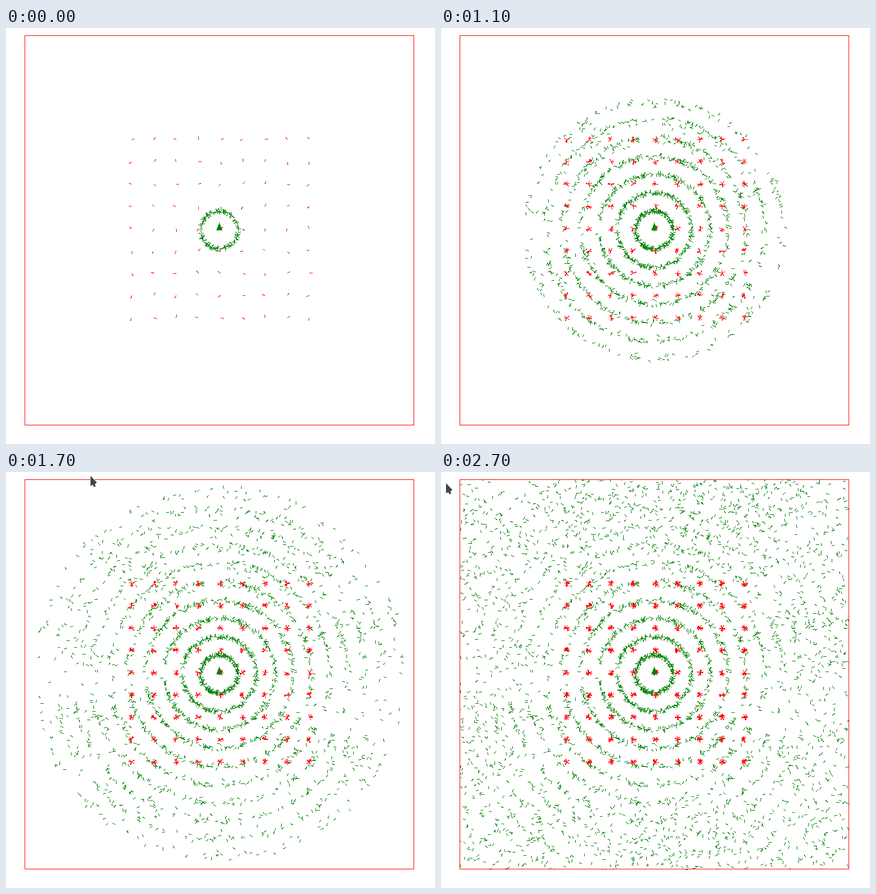
Write an HTML page that moves like this. It is 761 px wide and 736 px high and loops after 2.8 s.

```html
<!DOCTYPE html>
<html lang="en">
<head>
<meta charset="utf-8">
<style>
  html, body { margin: 0; width: 100%; height: 100%; overflow: hidden; background: #fff; }
  svg { display: block; }
  path, rect { fill: none; shape-rendering: crispEdges; }
  .walk { stroke: #008000; }
  .beacon, rect { stroke: #f00; }
  #robot { fill: #008000; }
  #cursor { fill: #444; stroke: #e4e4e4; stroke-width: 1.5; paint-order: stroke; shape-rendering: auto; }
</style>
</head>
<body>
<svg width="761" height="736" viewBox="0 0 761 736">
  <defs><clipPath id="room"><path d="M33 13H724V704H33Z"/></clipPath></defs>
  <g id="marks" clip-path="url(#room)"></g>
  <rect x="33.5" y="13.5" width="690" height="689"/>
  <path id="robot" d="M378.5 344L384 358H373Z"/>
  <path id="cursor" d="M0 0L11 11.5L7.5 14.5L9 18L6 19.5L4 15.5L0 17.5Z"/>
</svg>
<script>
const LOOP = 2800, STEPS = 15, WALKERS = 290, EARLY = 190, STRIDE = 33.3;
const CENTER = { x: 378.5, y: 357.5 };
const ROOM = { left: 34, top: 14, right: 723, bottom: 703 };

// Pointer keys: start time, x, y
const POINTER = [
  [1400, 335, 52], [1500, 266, 25], [1600, 200, 16], [1700, 150, 7], [1800, 104, -5],
  [1900, 60, -14], [2000, 62, -17], [2100, 67, -17], [2200, 72, -17],
  [2300, 76, -18], [2700, 9, 20]
];

let seed = 20731;
function random() {
  seed = (seed + 0x6D2B79F5) | 0;
  let t = Math.imul(seed ^ (seed >>> 15), 1 | seed);
  t ^= t + Math.imul(t ^ (t >>> 7), 61 | t);
  return ((t ^ (t >>> 14)) >>> 0) / 4294967296;
}

const turn = () => random() * 2 * Math.PI;
const stepTime = i => i < 2 ? i * 200 : i * 200 - 100;

// A short stroke leaving a point in a random direction
function tick(x, y) {
  const a = turn();
  return `M${x.toFixed(1)} ${y.toFixed(1)}l${(5.5 * Math.cos(a)).toFixed(1)} ${(5.5 * Math.sin(a)).toFixed(1)}`;
}

function bounce(v, low, high) {
  return v < low ? 2 * low - v : v > high ? 2 * high - v : v;
}

const marks = document.getElementById('marks');
function addPath(className, d) {
  const path = document.createElementNS('http://www.w3.org/2000/svg', 'path');
  path.setAttribute('class', className);
  path.setAttribute('d', d);
  marks.append(path);
  return path;
}

const walkers = Array.from({ length: WALKERS }, (_, i) => ({
  x: CENTER.x, y: CENTER.y, heading: turn(), start: i < EARLY ? 0 : 1
}));

const layers = [];
for (let step = 0; step < STEPS; step++) {
  let green = '', red = '';
  for (const w of walkers) {
    if (step < w.start) continue;
    if (step > w.start) w.heading += (random() - 0.5) * 0.8;
    const x = w.x + STRIDE * Math.cos(w.heading);
    const y = w.y + STRIDE * Math.sin(w.heading);
    w.x = bounce(x, ROOM.left, ROOM.right);
    w.y = bounce(y, ROOM.top, ROOM.bottom);
    if (w.x !== x) w.heading = Math.PI - w.heading;
    if (w.y !== y) w.heading = -w.heading;
    green += tick(w.x, w.y);
  }
  for (let row = 0; row < 9; row++)
    for (let col = 0; col < 9; col++)
      red += tick(223 + col * 39.4, 197.5 + row * 39.4);
  layers.push([addPath('walk', green), addPath('beacon', red)]);
}
// Beacons lie above every walker stroke
layers.forEach(([, beacon]) => marks.append(beacon));

const cursor = document.getElementById('cursor');
function draw(now) {
  const t = now % LOOP;
  layers.forEach((pair, i) => {
    for (const path of pair) path.style.display = t >= stepTime(i) ? '' : 'none';
  });
  const key = POINTER.filter(k => k[0] <= t).pop();
  cursor.style.display = key ? '' : 'none';
  if (key) cursor.setAttribute('transform', `translate(${key[1]} ${key[2]})`);
}

const begin = performance.now();
function frame() {
  draw(performance.now() - begin);
  requestAnimationFrame(frame);
}
frame();
</script>
</body>
</html>
```
